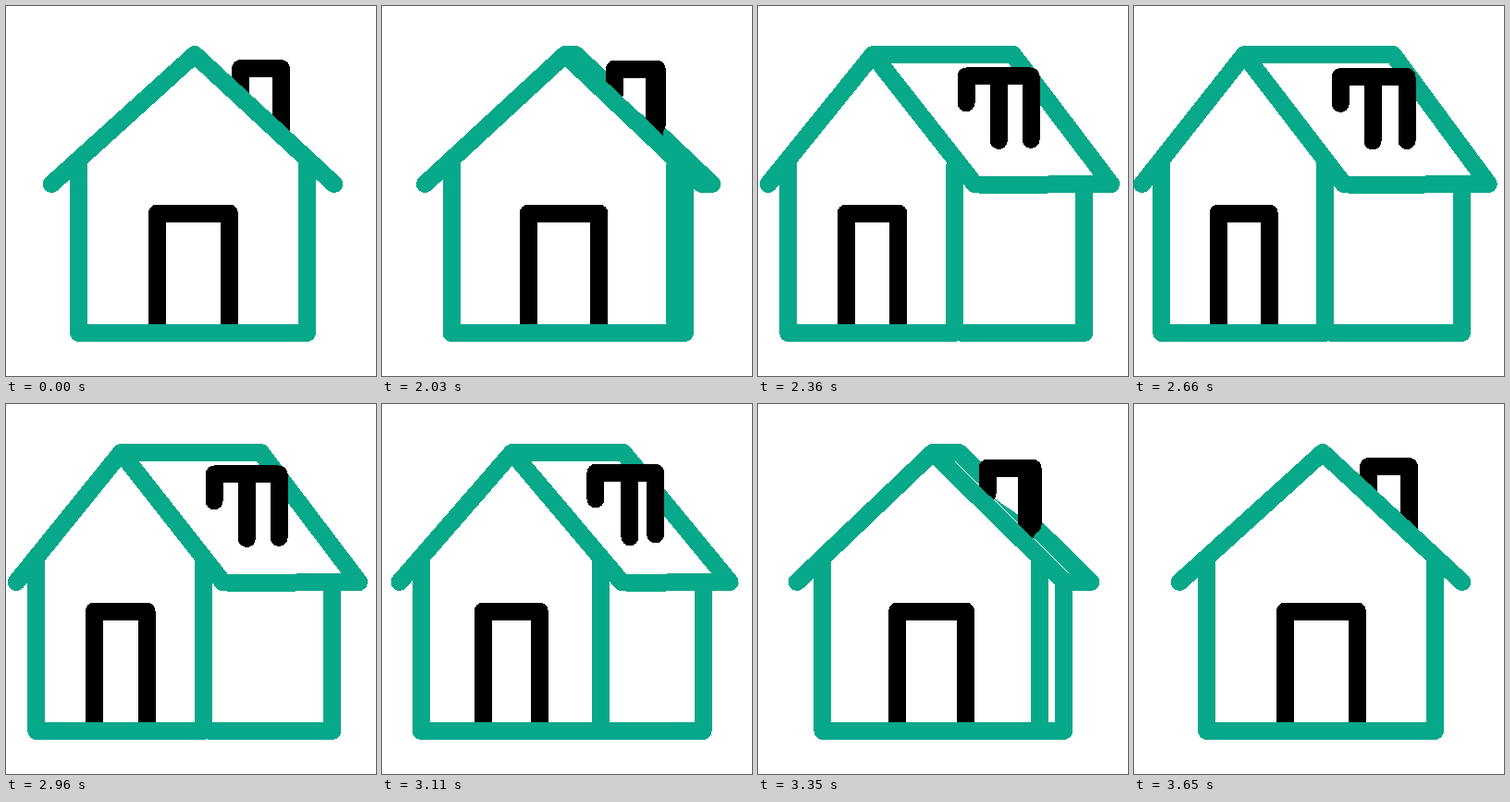
An HTML page without scripts that plays this animation: 400 px wide and 400 px high, repeating every 3680 ms.

```html
<!DOCTYPE html>
<html lang="en">
<head>
<meta charset="utf-8">
<title>Turning house</title>
<style>
  html, body { margin: 0; width: 100%; height: 100%; overflow: hidden; background: #fff; }
  svg { display: block; width: 100%; height: 100%; shape-rendering: crispEdges; }

  path {
    fill: none;
    stroke: #08a88a;
    stroke-width: 19;
    stroke-linecap: round;
    stroke-linejoin: round;
    d: var(--flat);
    animation: turn 3680ms infinite;
  }
  .dark { stroke: #000; }

  /* Each part morphs from the front view to the three-quarter view and back */
  @keyframes turn {
    0% { d: var(--flat); }
    54.43% { d: var(--flat); animation-timing-function: cubic-bezier(.2, .2, .2, 1); }
    69.02% { d: var(--turned); }
    75.14% { d: var(--turned); animation-timing-function: cubic-bezier(.6, 0, .4, 1); }
    99.32%, 100% { d: var(--flat); }
  }

  .back-wall {
    --flat: path("M325.5 353.5 L325.5 353.5 L325.5 192");
    --turned: path("M215 353.8 L354.5 353.5 L354.5 192");
  }
  .back-roof {
    --flat: path("M204 52.5 L204 52.5 L354.7 192.5 L354.7 192.5");
    --turned: path("M119.3 52.5 L280 52.5 L383.3 192.5 L235 193.6");
  }
  /* White walls hide the roof edge behind the chimney */
  .chimney {
    fill: #fff;
    --flat: path("M253.5 95 L253.5 67.5 L297.5 67.5 L297.5 127.5 M297.5 67.5 L297.5 137");
    --turned: path("M223.3 105.5 L223.3 76.5 L295 76.5 L295 145.5 M258 76.5 L258 146");
  }
  .door {
    --flat: path("M163.5 345 L163.5 224 L241.5 224 L241.5 345");
    --turned: path("M91 345 L91 224 L146.3 224 L146.3 345");
  }
  .front-wall {
    --flat: path("M78.5 170 L78.5 353.5 L325.5 353.5 L325.5 171");
    --turned: path("M29.8 170 L29.8 353.5 L206 353.5 L206 171");
  }
  .front-roof {
    --flat: path("M49.3 192.5 L204 52.5 L354.7 192.5");
    --turned: path("M8.8 192.5 L119.3 52.5 L227 192.8");
  }
</style>
</head>
<body>
<svg viewBox="0 0 400 400">
  <path class="back-wall"/>
  <path class="back-roof"/>
  <path class="chimney dark"/>
  <path class="door dark"/>
  <path class="front-wall"/>
  <path class="front-roof"/>
</svg>
</body>
</html>
```
